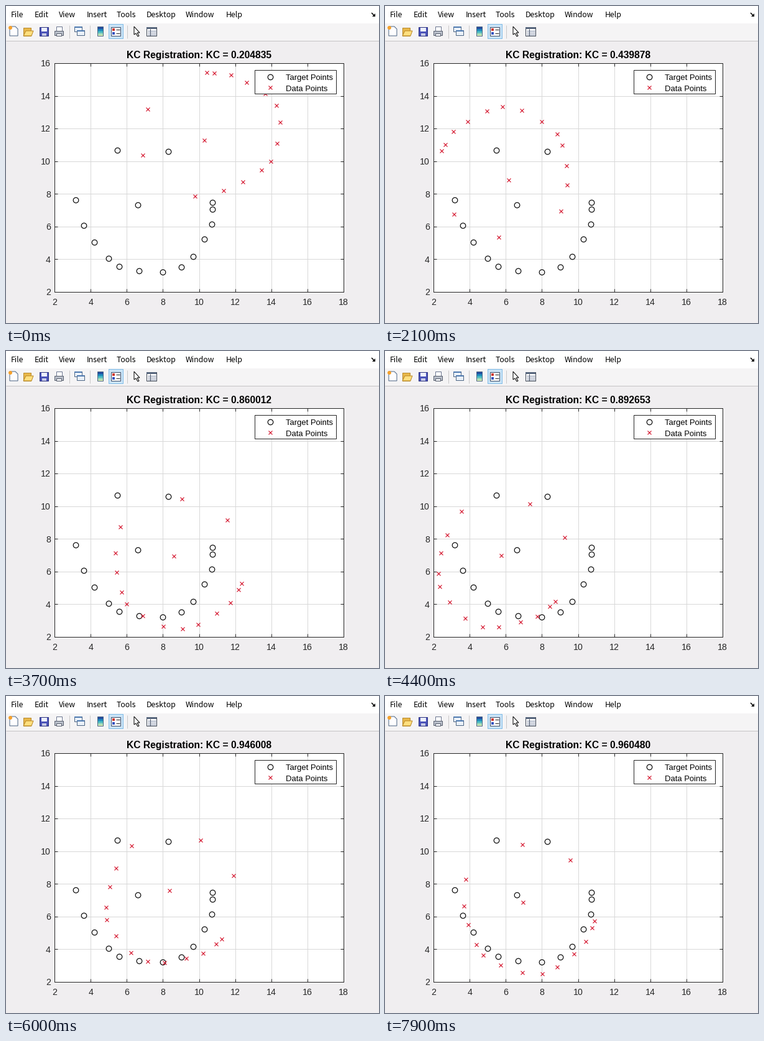
These frames come from a looping animation (600x510 px, 8 s). A matplotlib script:

```python
import numpy as np
import matplotlib.pyplot as plt
from matplotlib.animation import FuncAnimation
from matplotlib.patches import Polygon, Rectangle, Circle

W, H, DPI = 600, 510, 80
PT = 72 / DPI                      # points per pixel
FRAMES, STEP = 80, 100
INK, RED, BLUE = "#262626", "#d4142c", "#4d6584"
L, R, T, B = 78, 543, 92, 460
SX, SY = (R - L) / 16, (B - T) / 14

fig = plt.figure(figsize=(W / DPI, H / DPI), dpi=DPI, facecolor="#f0eef0")
ax = fig.add_axes([0, 0, 1, 1])
ax.set_xlim(0, W)
ax.set_ylim(H, 0)
ax.axis("off")


def rect(x, y, w, h, fc, ec="none", z=2):
    ax.add_patch(Rectangle((x, y), w, h, fc=fc, ec=ec, lw=PT, zorder=z))


def poly(pts, fc, ec="none", z=2):
    ax.add_patch(Polygon(pts, fc=fc, ec=ec, lw=PT, zorder=z))


def line(x0, y0, x1, y1, color=INK, lw=1, z=3):
    ax.plot([x0, x1], [y0, y1], color=color, lw=lw * PT, zorder=z,
            solid_capstyle="butt")


def text(x, y, s, size, font="Liberation Sans", color="black", z=9, **kw):
    return ax.text(x, y, s, fontsize=size * PT, family=font, color=color,
                   va="baseline", zorder=z, **kw)


def marks(x, y, kind, z):
    size, color = (8.6, "black") if kind == "o" else (6, RED)
    return ax.plot(x, y, kind, ms=size * PT, mfc="none", mec=color,
                   mew=1.15 * PT, zorder=z)[0]


def menu_bar():
    rect(0, 0, W, 28, "white")
    x = (8, 46, 86, 130, 178, 226, 289, 354)
    names = "File Edit View Insert Tools Desktop Window Help".split()
    for left, s in zip(x, names):
        text(left - 0.6, 17.7, s, 12.3, "Noto Sans CJK JP")
    line(588, 11, 592, 15, "black", 1.5)
    poly([(594, 12), (594, 17), (589, 17)], "black")


def tool_bar(y=41):
    rect(0, 28, W, 28, "#f5f4f5", z=1)
    line(0, 56, W, 56, "#c4c2c4")
    for x in (102, 135, 195):
        line(x, y - 10, x, y + 11, "#c9c9c9")

    # new
    poly([(6, 33), (15, 33), (19, 37), (19, 48), (6, 48)], "#fdfdff", BLUE)
    ax.add_patch(Circle((7, 35), 3, fc="#f5a12c", zorder=3))

    # open
    rect(28, 35, 12, 13, "#e9b84a", "#b98a2a")
    poly([(28, 48), (32, 40), (44, 40), (41, 48)], "#ffdf7e", "#b98a2a")

    # save
    rect(54, 34, 14, 14, "#4a52b8", "#2d3480")
    rect(57, 35, 9, 6, "#eef1fb", z=3)
    rect(58, 44, 7, 4, "#c7cbe6", z=3)

    # print
    rect(81, 33, 9, 8, "white", "#6b7690")
    rect(78, 40, 14, 7, "#b9bfca", "#5b6270")
    rect(81, 44, 8, 4, "#eef0f4", "#5b6270", z=3)

    # link
    for x, top in ((110, 33), (114, 39)):
        rect(x, top, 12, 8, "#eaf1f9", BLUE)
        rect(x, top, 12, 2, "#4d79b0", z=3)

    # colour bar
    for k in range(5):
        rect(148, 34 + 3 * k, 8, 3, plt.cm.YlGnBu(0.8 - 0.15 * k))
    rect(147, 33, 9, 15, "none", BLUE, z=3)

    # legend, switched on
    rect(165, 29, 23, 23, "#cbe4f6", "#7fbce8")
    rect(169, 34, 15, 14, "white", "#3d4c66", z=3)
    for top, c in ((36, "#d03a30"), (42, "#3454c0")):
        rect(171, top, 4, 4, c, z=4)
        line(177, top + 2, 183, top + 2, z=4)

    # pointer
    poly([(206, 33), (206, 46), (209, 44), (212, 49), (214, 48), (211, 43),
          (215, 43)], "white", "black")

    # property panel
    rect(226, 34, 16, 14, "white", "#3d4654")
    rect(226, 34, 16, 3, "#56657c", z=3)
    line(232, 37, 232, 48, "#3d4654")
    for k in range(3):
        line(228, 40 + 3 * k, 241, 40 + 3 * k, "#7482a0")


def plot_frame():
    rect(L, T, R - L, B - T, "white", z=1)
    for v in range(2, 19, 2):
        x = L + (v - 2) * SX
        line(x, T, x, B, "#d8d8d8", z=2)
        for y, d in ((B, -5), (T, 5)):
            line(x, y, x, y + d)
        text(x, 480.6, v, 14.2, color=INK, ha="center")
    for v in range(2, 17, 2):
        y = B - (v - 2) * SY
        line(L, y, R, y, "#d8d8d8", z=2)
        for x, d in ((L, 5), (R, -5)):
            line(x, y, x + d, y)
        text(72, y + 5.3, v, 14.2, color=INK, ha="right")
    rect(L, T, R - L, B - T, "none", INK, z=4)


def legend():
    rect(400, 103, 131, 38, "white", INK, z=7)
    for y, kind, s in ((114, "o", "Target Points"), (131.4, "x", "Data Points")):
        marks([425], [y], kind, 8)
        text(450, y + 5.3, s, 13)


# eyes, nose, then the mouth from left to right
FACE = np.array([
    (179, 232), (261, 234), (212, 320), (112, 312), (125, 353), (142, 380),
    (165, 406), (182, 419), (214, 426), (252, 428), (282, 420), (301, 403),
    (319, 375), (331, 351), (332, 327), (332, 316)])
SHAPE = (FACE - (212, 321.5)) / (SX, -SY)

# time, centre x, centre y, turn in degrees, KC
KEYS = np.array([
    (0, 321, 216, 86, .204835), (800, 316, 230, 96.4, .231244),
    (2100, 200, 279, 152, .439878), (2900, 208, 294, 221, .65),
    (3700, 269, 331, 333.8, .860012), (4500, 184, 328, 311, .896),
    (5100, 259, 311, 299, .923513), (6900, 221, 329, 334.9, .955361),
    (7900, 221, 333, 341.4, .960480)])
TIMES, POSES = KEYS[:, 0], KEYS[:, 1:]
SLOPES = np.gradient(POSES, TIMES, axis=0)


def pose(t):
    """Cubic Hermite path through the keys."""
    i = min(np.searchsorted(TIMES, t, side="right") - 1, len(TIMES) - 2)
    h = TIMES[i + 1] - TIMES[i]
    u = (t - TIMES[i]) / h
    ease = u * u * (3 - 2 * u)
    return (POSES[i] + ease * (POSES[i + 1] - POSES[i])
            + h * u * (1 - u) * ((1 - u) * SLOPES[i] - u * SLOPES[i + 1]))


menu_bar()
tool_bar()
plot_frame()
legend()
marks(*FACE.T, "o", 5)
data = marks([], [], "x", 6)
title = text(311, 83.7, "", 15.6, weight="bold", ha="center")


def update(i):
    cx, cy, deg, kc = pose(i * STEP)
    c, s = np.cos(np.radians(deg)), np.sin(np.radians(deg))
    px, py = SHAPE.T
    x = cx + SX * (c * px - s * py)
    y = cy - SY * (s * px + c * py)
    inside = (x >= L) & (x <= R) & (y >= T) & (y <= B)
    data.set_data(x[inside], y[inside])
    title.set_text(f"KC Registration: KC = {kc:.6f}")
    return data, title


anim = FuncAnimation(fig, update, frames=FRAMES, interval=STEP,
                     repeat=True, repeat_delay=0)
plt.show()
```
